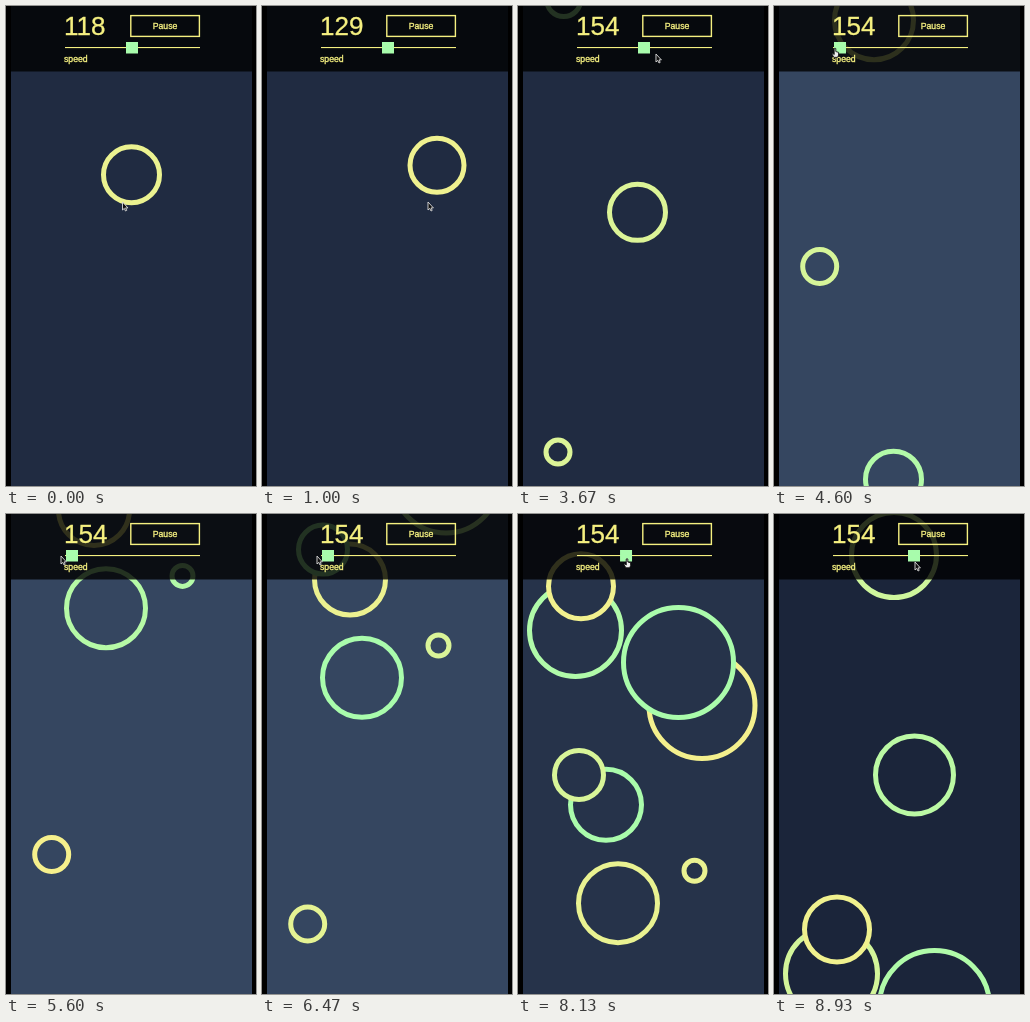
Recreate the animation shown at these times as an HTML page with a canvas. Size 250x480 px, loop 8990 ms.

```html
<!DOCTYPE html>
<html lang="en">
<head>
<meta charset="utf-8">
<title>Falling rings</title>
<style>
  html, body { margin: 0; width: 100%; height: 100%; overflow: hidden; background: #000; }
  canvas { display: block; width: 250px; height: 480px; }
</style>
</head>
<body>
<canvas id="stage" width="250" height="480"></canvas>
<script>
const ctx = document.getElementById('stage').getContext('2d');
const LOOP = 8990;
const FIRST_SPAWN = -455, SPAWN_EVERY = 512, HIT_DELAY = 510;
const COLOUR_PERIOD = 5, STROKE = 5;
const YELLOW = [246, 240, 140], GREEN = [168, 252, 172];
const SLOW_BG = [53, 70, 96], FAST_BG = [27, 37, 58];
const INK = '#f5f080';

// Slider drags: start, end, thumb travel in pixels
const THUMB_START = 126;
const drags = [[4150, 4270, -60], [7470, 7800, 26], [7800, 8130, 16], [8130, 8900, 32]];

// One ring per spawn: x, radius, second of its greenest colour, points if it gets clicked
const rings = [
  [125.5, 28, 1.9, 6], [50, 31, 0.3, 5], [175, 27, 3, 6], [77, 28, 0.7, 6], [207, 36, 3.6, 5],
  [193, 32, 1.5, 8], [40, 12, 5.2], [119.5, 28, 5.2], [45.7, 17, 8.2], [100, 39.5, 6.3],
  [176.5, 10.5, 5], [88, 35.5, 8.4], [61, 24.5, 6.7], [184, 53, 5.4], [160.5, 55, 8.4],
  [57.5, 46, 7.6], [63, 32.5, 6], [140.5, 39, 8.1], [120, 42.5, 7.7]
].map(([x, radius, greenest, points = 0], i) => {
  const spawn = FIRST_SPAWN + i * SPAWN_EVERY;
  return { x, radius, greenest, points, spawn, hit: points ? spawn + HIT_DELAY : Infinity };
});
const hitRings = rings.filter(ring => ring.points);

// Pointer waypoints: visit each clicked ring, then the slider
const pointer = [
  ...hitRings.flatMap(({ x, hit }) => [[hit - 120, x - 9, 196], [hit, x - 9, 196]]),
  [3670, 138, 48], [4150, 126, 43], [4270, 66, 43], [5000, 55, 42], [6500, 55, 42], [7000, 67, 45]
];

const mix = (a, b, k) => a + (b - a) * k;
const blend = (a, b, k) => `rgb(${a.map((v, i) => Math.round(mix(v, b[i], k)))})`;
const ramp = (t, a, b) => Math.min(1, Math.max(0, (t - a) / (b - a)));
const rampArea = (t, a, b) => ramp(t, a, b) ** 2 * (b - a) / 2 + Math.max(0, t - b);
const thumb = t => drags.reduce((x, [a, b, move]) => x + move * ramp(t, a, b), THUMB_START);

// Distance fallen: speed rises linearly with the thumb position, integrated over time
const START_SPEED = 0.437, SPEED_PER_PIXEL = 0.00595;
const fallen = t => drags.reduce(
  (sum, [a, b, move]) => sum + SPEED_PER_PIXEL * move * rampArea(t, a, b), START_SPEED * t);

function pointerAt(t) {
  const i = pointer.findIndex(point => point[0] > t);
  if (i < 0) return [thumb(t) + 1, t > 8900 ? 48 : 45];
  const [a, x, y] = pointer[Math.max(0, i - 1)], [b, nextX, nextY] = pointer[i];
  const k = ramp(t, a, b);
  return [mix(x, nextX, k), mix(y, nextY, k)];
}

function drawRing({ x, radius, greenest, spawn, hit }, t) {
  if (t < spawn || t >= hit) return;
  const green = 0.5 + 0.5 * Math.cos((t / 1000 - greenest) / COLOUR_PERIOD * 2 * Math.PI);
  const y = fallen(t) - fallen(spawn) - radius - STROKE / 2;
  ctx.strokeStyle = blend(YELLOW, GREEN, green);
  ctx.lineWidth = STROKE;
  ctx.beginPath();
  ctx.arc(x, y, radius, 0, 2 * Math.PI);
  ctx.fill();
  ctx.stroke();
}

function label(text, x, y, size, align = 'left') {
  ctx.font = `${size}px "Liberation Sans", Arial, sans-serif`;
  ctx.textAlign = align;
  ctx.fillStyle = ctx.strokeStyle = INK;
  ctx.lineWidth = 0.35;
  ctx.fillText(text, x, y);
  ctx.strokeText(text, x, y);
}

function drawHeader(t) {
  ctx.fillStyle = 'rgba(0, 0, 0, .8)';
  ctx.fillRect(5, 0, 241, 65.5);
  const score = hitRings.reduce((sum, { hit, points }) => sum + (t >= hit ? points : 0), 118);
  label(score, 58, 29, 26);
  label('Pause', 159, 23, 8.7, 'center');
  label('speed', 58, 56, 8.7);
  ctx.lineWidth = 1.4;
  ctx.strokeRect(124.8, 9.6, 68.6, 20.8);
  ctx.fillRect(59, 41, 135, 1.1);
  ctx.fillStyle = `rgb(${GREEN})`;
  ctx.fillRect(thumb(t) - 6, 36, 12, 11.5);
}

function drawPoints(t) {
  const ring = hitRings.find(({ hit }) => t >= hit && t < hit + 420);
  if (!ring) return;
  ctx.globalAlpha = ramp(t, ring.hit + 420, ring.hit + 270);
  label('+' + ring.points, 125.5, 262, 26, 'center');
  ctx.globalAlpha = 1;
}

const arrow = new Path2D('M0 0V8L1.8 6.4L3 9L4.2 8.4L3.1 5.9H5.4Z');
const hand = new Path2D('M-.8 0Q0-.8 .8 0V3L3.6 3.8V6.5L2.6 8.8H-1.2L-3 5.5L-2.2 4.8L-.8 6Z');

function drawPointer(t) {
  const [x, y] = pointerAt(t);
  const overThumb = y < 47 && Math.abs(x - thumb(t)) < 6;
  const shape = overThumb ? hand : arrow;
  ctx.save();
  ctx.translate(x, y);
  ctx.lineWidth = 0.9;
  ctx.strokeStyle = overThumb ? '#111' : '#ddd';
  ctx.fillStyle = overThumb ? '#eee' : '#111';
  ctx.fill(shape);
  ctx.stroke(shape);
  ctx.restore();
}

function draw(t) {
  ctx.fillStyle = '#000';
  ctx.fillRect(0, 0, 250, 480);
  ctx.save();
  ctx.beginPath();
  ctx.rect(5, 0, 241, 480);
  ctx.clip();
  // Rings are filled with the background colour, so newer ones cover older ones
  ctx.fillStyle = blend(SLOW_BG, FAST_BG, (thumb(t) - 66) / 74);
  ctx.fillRect(5, 0, 241, 480);
  rings.forEach(ring => drawRing(ring, t));
  drawHeader(t);
  drawPoints(t);
  ctx.restore();
  drawPointer(t);
}

const begin = performance.now();
function frame() {
  draw((performance.now() - begin) % LOOP);
  requestAnimationFrame(frame);
}
frame();
</script>
</body>
</html>
```
